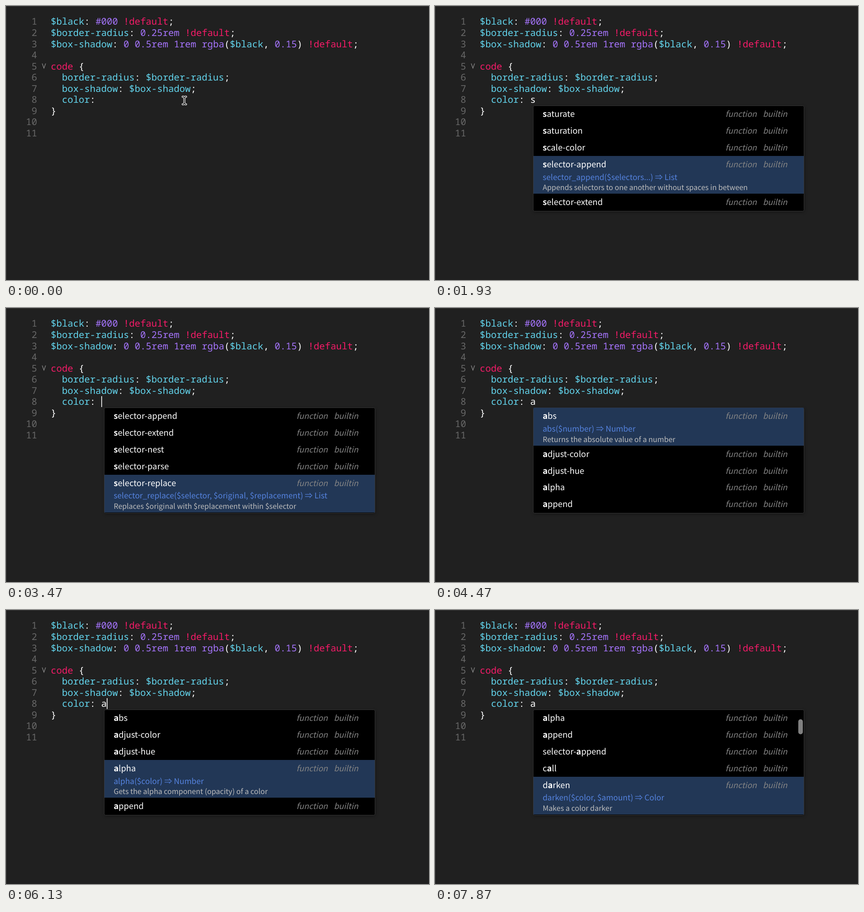
An HTML page for the animation above (8 s loop, 928x603 px).

```html
<!DOCTYPE html>
<html lang="en">
<head>
<meta charset="utf-8">
<title>Stylesheet autocomplete</title>
<style>
  html, body { margin: 0; width: 100%; height: 100%; overflow: hidden; background: #202020; }
  svg { display: block; }
  text { white-space: pre; text-rendering: geometricPrecision; fill: #fff; }
  .code { font-family: "Noto Sans Mono", "DejaVu Sans Mono", monospace; font-size: 20.47px; }
  .list { font-family: "Noto Sans CJK JP", "Noto Sans CJK SC", "Noto Sans", sans-serif; font-size: 18.26px; }
  .number { fill: #686868; text-anchor: end; }
  .pink { fill: #f51b68; }
  .purple { fill: #a574fb; }
  .cyan { fill: #63d4ec; }
  .match { font-weight: 700; }
  .kind { font-size: 17.6px; font-style: italic; fill: #858585; }
  .signature { font-size: 17.2px; fill: #5583df; }
  .note { font-size: 15.94px; fill: #bdbdbd; }
  .popup { fill: #000; stroke: #363636; filter: drop-shadow(1px 2px 3px rgba(0, 0, 0, .3)); }
  .selected { fill: #223756; shape-rendering: crispEdges; }
</style>
</head>
<body>
<svg width="928" height="603" viewBox="0 0 928 603">
  <rect width="928" height="603" fill="#202020"/>
  <path d="M0 .5H928M.5 0V603" stroke="#3a3a3a"/>
  <g id="editor" class="code"></g>
  <path d="M79.4 126.5L83.2 136.8L87 126.5" fill="none" stroke="#8a8a8a" stroke-width="1.3"/>
  <g id="live"></g>
</svg>
<script>
const LOOP = 8000, BLINK = 530;
const LEFT = 98.2, COLUMN = 12.28, LINE = 24.56, BASELINE = 41.4;
const ROW = 36.83, OPEN_ROW = 83.4, NOTE_LINE = 17.7;
const VIEW = { x: 216, y: 219.4, width: 593, height: 230.6 };
const THUMB_HOLD = 800, THUMB_FADE = 130;

const lines = [
  '$black: #000 !default;',
  '$border-radius: 0.25rem !default;',
  '$box-shadow: 0 0.5rem 1rem rgba($black, 0.15) !default;',
  '',
  'code {',
  '  border-radius: $border-radius;',
  '  box-shadow: $box-shadow;',
  '  color:',
  '}', '', ''
];

// Each item: label, signature, note ("|" breaks the note into lines).
const sessions = [
  {
    letter: 's', typed: 335, shown: 395, erased: 3460, hidden: 3525,
    presses: [1595, 1765, 1930, 2100, 2270, 2400, 2530],
    items: [
      ['saturate', 'saturate($color, $amount) ⇒ Color', 'Makes a color more saturated'],
      ['saturation', 'saturation($color) ⇒ Number', 'Gets the saturation component of a color'],
      ['scale-color', 'scale_color($color, $kwargs...) ⇒ Color', 'Fluidly scales one or more components of a color'],
      ['selector-append', 'selector_append($selectors...) ⇒ List', 'Appends selectors to one another without spaces in between'],
      ['selector-extend', 'selector_extend($selector, $extendee, $extender) ⇒ List', 'Extends $extendee with $extender within $selector'],
      ['selector-nest', 'selector_nest($selectors...) ⇒ List', 'Nests selector beneath one another like they would be nested in the|stylesheet'],
      ['selector-parse', 'selector_parse($selector) ⇒ List', 'Parses a selector into the format returned by &amp;'],
      ['selector-replace', 'selector_replace($selector, $original, $replacement) ⇒ List', 'Replaces $original with $replacement within $selector']
    ]
  },
  {
    letter: 'a', typed: 3935, shown: 3995, erased: Infinity, hidden: Infinity,
    presses: [5060, 5400, 5860, 6395, 6660, 6930, 7200],
    items: [
      ['abs', 'abs($number) ⇒ Number', 'Returns the absolute value of a number'],
      ['adjust-color', 'adjust_color($color, $kwargs...) ⇒ Color', 'Increases or decreases one or more components of a color'],
      ['adjust-hue', 'adjust_hue($color, $degrees) ⇒ Color', 'Changes the hue of a color'],
      ['alpha', 'alpha($color) ⇒ Number', 'Gets the alpha component (opacity) of a color'],
      ['append', 'append($list, $val, $separator) ⇒ List', 'Appends a single value onto the end of a list'],
      ['selector-append', 'selector_append($selectors...) ⇒ List', 'Appends selectors to one another without spaces in between'],
      ['call', 'call($name, $args...) ⇒ Value', 'Dynamically calls a function'],
      ['darken', 'darken($color, $amount) ⇒ Color', 'Makes a color darker']
    ]
  }
];

const text = (x, y, content, style = '') => `<text x="${x}" y="${y}" class="${style}">${content}</text>`;
const rect = (x, y, width, height, attrs) =>
  `<rect x="${x}" y="${y}" width="${width}" height="${height}" ${attrs}/>`;
const lineY = row => BASELINE + row * LINE;

const highlight = line => line.replace(
  /(!default|^code)|(#000|rgba|\d[\d.]*(?:rem)?)|(\$?[a-z][\w-]*)/g,
  (token, pink, purple) => `<tspan class="${pink ? 'pink' : purple ? 'purple' : 'cyan'}">${token}</tspan>`);

function drawItem([label, signature, note], letter, y, open) {
  const row = text(20.2, y + 24.95, label.replace(letter, `<tspan class="match">${letter}</tspan>`)) +
    text(421, y + 24.95, 'function', 'kind') + text(503.2, y + 24.95, 'builtin', 'kind');
  if (!open) return row;
  const notes = note.split('|');
  const height = OPEN_ROW + (notes.length - 1) * NOTE_LINE;
  return rect(0, y, VIEW.width, height, 'class="selected"') + row +
    text(20.2, y + 52.7, signature, 'signature') +
    notes.map((part, i) => text(20.2, y + 75.6 + i * NOTE_LINE, part, 'note')).join('');
}

function drawPopup({ items, letter, presses }, time) {
  const selected = presses.filter(press => press <= time).length;
  const extra = (items[selected][2].split('|').length - 1) * NOTE_LINE;
  const openHeight = OPEN_ROW + extra;
  const scroll = Math.max(0, selected * ROW + openHeight - VIEW.height);
  const rows = items.map((item, i) => {
    const y = i * ROW - scroll + (i > selected ? openHeight - ROW : 0);
    return drawItem(item, letter, y, i === selected);
  }).join('');

  let thumb = '';
  if (selected > 4) {
    const idle = time - presses[selected - 1];
    const opacity = Math.min(1, Math.max(0, 1 - (idle - THUMB_HOLD) / THUMB_FADE));
    thumb = rect(581, .1 + scroll * .19, 10, 33, `rx="5" fill="#808080" opacity="${opacity}"`);
  }
  return rect(215.5, 219.5, 594, 232, 'rx="3" class="popup"') +
    `<svg class="list" x="${VIEW.x}" y="${VIEW.y}" width="${VIEW.width}" height="${VIEW.height}">${rows}${thumb}</svg>`;
}

function drawPointer() {
  const beam = 'M387.5 199.7Q391.3 199.7 391.3 203V213Q391.3 216.3 387.5 216.3' +
    'M395.1 199.7Q391.3 199.7 391.3 203M391.3 213Q391.3 216.3 395.1 216.3';
  const stroke = (color, width) =>
    `<path d="${beam}" fill="none" stroke="${color}" stroke-width="${width}" stroke-linecap="round"/>`;
  return stroke('#fff', 4.2) + stroke('#202020', 1.8);
}

function drawLive(time) {
  const session = sessions.findLast(({ typed }) => typed <= time);
  if (!session) return drawPointer();

  const { letter, typed, shown, erased, hidden } = session;
  const hasLetter = time < erased;
  const lastEdit = hasLetter ? typed : erased;
  let output = '';
  if (hasLetter) output += text(LEFT + 9 * COLUMN, lineY(7), letter, 'code');
  if (Math.floor((time - lastEdit) / BLINK) % 2 === 0) {
    output += rect(hasLetter ? 221 : 209, 194, 1.6, 24, 'fill="#fff"');
  }
  if (time >= shown && time < hidden) output += drawPopup(session, time);
  return output;
}

const live = document.getElementById('live');
let previous;
function render() {
  const markup = drawLive(performance.now() % LOOP);
  if (markup !== previous) live.innerHTML = previous = markup;
  requestAnimationFrame(render);
}

document.getElementById('editor').innerHTML = lines.map((line, i) =>
  text(68.2, lineY(i), i + 1, 'number') + text(LEFT, lineY(i), highlight(line))).join('');
render();
</script>
</body>
</html>
```
